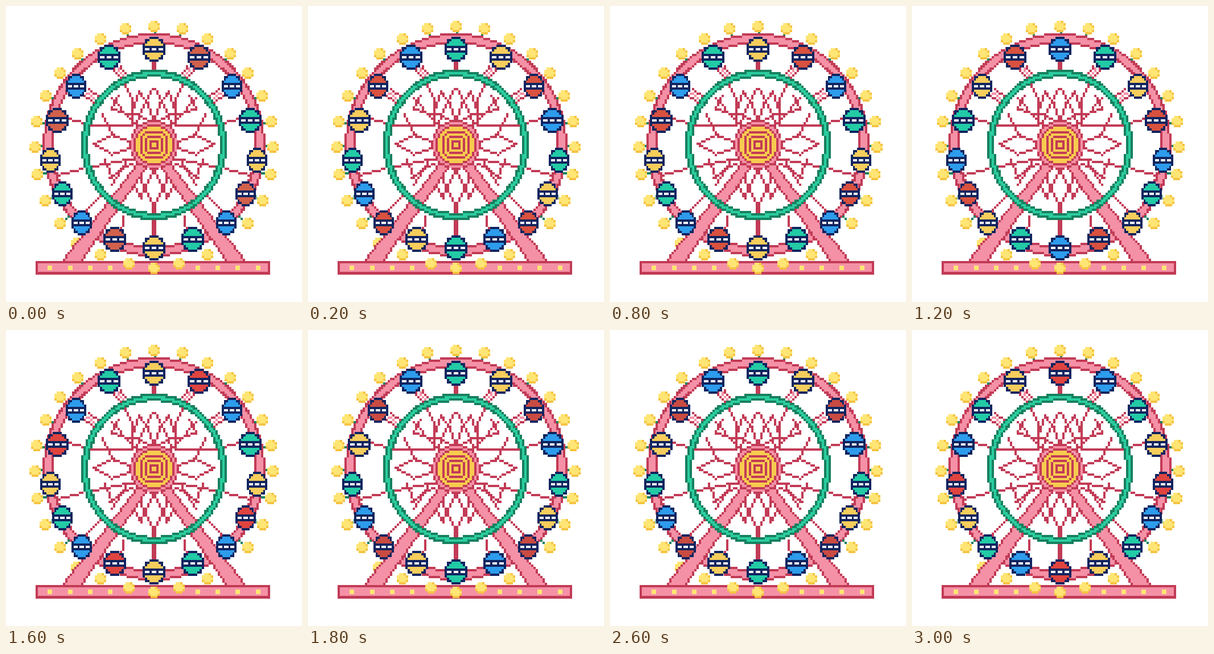
These frames come from a looping animation (520x520 px, 3200 ms). An HTML page with a canvas:

```html
<!DOCTYPE html>
<html lang="en">
<head>
<meta charset="utf-8">
<title>Ferris wheel</title>
<style>
html, body { margin: 0; width: 100%; height: 100%; overflow: hidden; background: #fff; }
canvas, svg { position: absolute; left: 0; top: 0; width: 520px; height: 520px; }
svg { shape-rendering: crispEdges; animation: reds 3.2s step-end infinite; }
.cabin { animation: chase .8s step-end infinite; }
@keyframes chase {
  0%, 100% { fill: #f7cd5c; }
  25% { fill: #22cba6; }
  50% { fill: #2e9cec; }
  75% { fill: var(--red); }
}
@keyframes reds {
  0%, 100% { --red: #d2614b; }
  6.25% { --red: #d9513f; }
  50% { --red: #e0443f; }
  56.25% { --red: #c94b42; }
  93.75% { --red: #e0443f; }
}
</style>
</head>
<body>
<canvas id="wheel" width="520" height="520"></canvas>
<svg id="cabins" viewBox="0 0 520 520">
  <symbol id="cabin" viewBox="0 0 10 11" preserveAspectRatio="none">
    <path fill="#10245f" d="M3 0h4v1h2v2h1v5h-1v2h-2v1h-4v-1h-2v-2h-1v-5h1v-2h2z"/>
    <path d="M3 1h4v1h1v1h1v1h-8v-1h1v-1h1zM1 7h8v1h-1v1h-1v1h-4v-1h-1v-1h-1z"/>
    <path fill="#fff" d="M1 5h2v1h-2zM4 5h2v1h-2zM7 5h2v1h-2z"/>
  </symbol>
</svg>
<script>
const CELL = 4, MID = 260, HUB = 244;
const PINK = '#f591a6', CRIMSON = '#c23b56', GREEN = '#2bcd9f', DARK = '#17805f';
const LIGHT = '#ffe574', AMBER = '#f5c443';
const ctx = document.getElementById('wheel').getContext('2d');

function rect(x, y, w, h, color) {
  ctx.fillStyle = color;
  ctx.fillRect(x, y, w, h);
}

function cell(x, y, color) {
  rect(Math.floor(x / CELL) * CELL, Math.floor(y / CELL) * CELL, CELL, CELL, color);
}

function line(x1, y1, x2, y2, color) {
  const n = Math.max(1, Math.ceil(Math.max(Math.abs(x2 - x1), Math.abs(y2 - y1)) / CELL));
  for (let i = 0; i <= n; i++) {
    cell(x1 + (x2 - x1) * i / n, y1 + (y2 - y1) * i / n, color);
  }
}

// Draws a line and its mirror image across the wheel's axis.
function pair(x1, y1, x2, y2, color = CRIMSON) {
  line(x1, y1, x2, y2, color);
  line(519.9 - x1, y1, 519.9 - x2, y2, color);
}

// Visits every cell; paint(dx, dy) returns a colour or nothing.
function shape(cx, cy, size, paint) {
  for (let y = cy - size; y < cy + size; y += CELL) {
    for (let x = cx - size; x < cx + size; x += CELL) {
      const color = paint(x + 2 - cx, y + 2 - cy);
      if (color) cell(x, y, color);
    }
  }
}

function ring(cy, rx, ry, thick, edge, fill) {
  shape(MID, cy, 200, (dx, dy) => {
    const depth = rx - Math.hypot(dx, dy * rx / ry);
    if (depth < 0 || depth > thick) return;
    return depth < 4 || depth > thick - 4 ? edge : fill;
  });
}

function bulb(x, y) {
  const rows = [' yya ', 'yyyya', 'yyyyy', 'ayyya', ' aaa '];
  rows.forEach((row, j) => [...row].forEach((c, i) => {
    if (c !== ' ') rect(x - 10 + i * CELL, y - 10 + j * CELL, CELL, CELL, c === 'y' ? LIGHT : AMBER);
  }));
}

function stem(x, y) {
  const dx = MID - x, dy = HUB - y, d = Math.hypot(dx, dy);
  line(x, y, x + dx / d * 18, y + dy / d * 18, DARK);
}

function leg(flip) {
  for (let y = 264; y < 448; y += CELL) {
    const outer = Math.round((232 - (y - 272) * 0.771) / CELL) * CELL;
    const inner = Math.round((250 - (y - 280) * 0.7) / CELL) * CELL;
    for (let x = outer; x < inner; x += CELL) {
      const edge = x === outer || x === inner - CELL;
      cell(flip ? 516 - x : x, y, edge ? CRIMSON : PINK);
    }
  }
}

const sideBulbs = [
  [210, 40], [166, 58], [126, 84], [95, 118], [70, 158], [54, 203],
  [51, 248], [55, 296], [69, 342], [95, 382]
];
const bulbs = [[260, 36], ...sideBulbs, ...sideBulbs.map(([x, y]) => [520 - x, y])];

// Left half of the lattice inside the green ring.
const lattice = [
  [258, 146, 240, 178], [240, 178, 230, 206], [234, 150, 248, 170],
  [248, 170, 258, 198], [234, 150, 222, 186], [222, 160, 222, 208],
  [205, 130, 222, 160], [222, 186, 250, 200], [186, 160, 228, 208],
  [184, 180, 196, 158], [184, 180, 222, 192], [147, 211, 222, 211],
  [168, 190, 190, 228], [154, 242, 186, 226], [186, 226, 218, 238],
  [154, 242, 186, 260], [186, 260, 218, 250], [147, 284, 222, 268],
  [174, 270, 186, 300], [182, 302, 222, 276], [186, 314, 214, 270],
  [222, 306, 236, 338], [236, 338, 258, 290], [256, 346, 236, 302]
];

// Struts between the green ring and the cabins.
const struts = [
  [258, 96, 258, 114], [200, 104, 216, 124], [188, 110, 204, 130],
  [146, 146, 160, 158], [136, 158, 152, 168], [108, 198, 134, 204],
  [94, 297, 134, 286], [140, 362, 166, 334], [203, 392, 206, 370],
  [258, 376, 258, 404], [258, 344, 258, 364]
];

bulbs.forEach(b => stem(...b));
ring(HUB, 195, 196, 18, CRIMSON, PINK);
pair(194, 106, 210, 128, PINK);
pair(141, 152, 156, 164, PINK);
struts.forEach(s => pair(...s));
lattice.forEach(s => pair(...s));
bulb(124, 417);
leg(false);
leg(true);
ring(245, 128, 132, 13, DARK, GREEN);

shape(MID, HUB, 44, (dx, dy) => {
  const r = Math.hypot(dx, dy);
  if (r > 43) return;
  if (r > 40) return CRIMSON;
  if (r > 36) return PINK;
  if (r > 33) return CRIMSON;
  const n = Math.pow(dx ** 4 + dy ** 4, 0.25);
  return n < 25 && Math.floor(n / CELL) % 2 ? CRIMSON : '#f8cb4f';
});

rect(52, 448, 412, 24, CRIMSON);
rect(56, 452, 404, 15, PINK);
for (const x of [77, 113, 148, 183]) {
  rect(x - 4, 456, 8, 8, LIGHT);
  rect(516 - x, 456, 8, 8, LIGHT);
}
bulbs.forEach(b => bulb(...b));
[[166, 437], [354, 437], [216, 453], [304, 453], [260, 461]].forEach(b => bulb(...b));

// Clockwise from the top: left, top, width.
const cabins = [
  [240, 54, 40], [319, 68, 40], [379, 119, 36], [409, 179, 40],
  [423, 249, 36], [403, 308, 36], [369, 359, 36], [308, 388, 40],
  [240, 403, 40], [171, 388, 40], [115, 359, 36], [81, 308, 36],
  [60, 249, 36], [70, 179, 40], [105, 119, 36], [161, 68, 40]
];
const svg = document.getElementById('cabins');
cabins.forEach(([x, y, width], i) => {
  const use = document.createElementNS('http://www.w3.org/2000/svg', 'use');
  const attrs = { href: '#cabin', class: 'cabin', x, y, width, height: 44 };
  for (const key in attrs) use.setAttribute(key, attrs[key]);
  use.style.animationDelay = (i % 4 - 4) * 200 + 'ms';
  svg.append(use);
});
</script>
</body>
</html>
```
